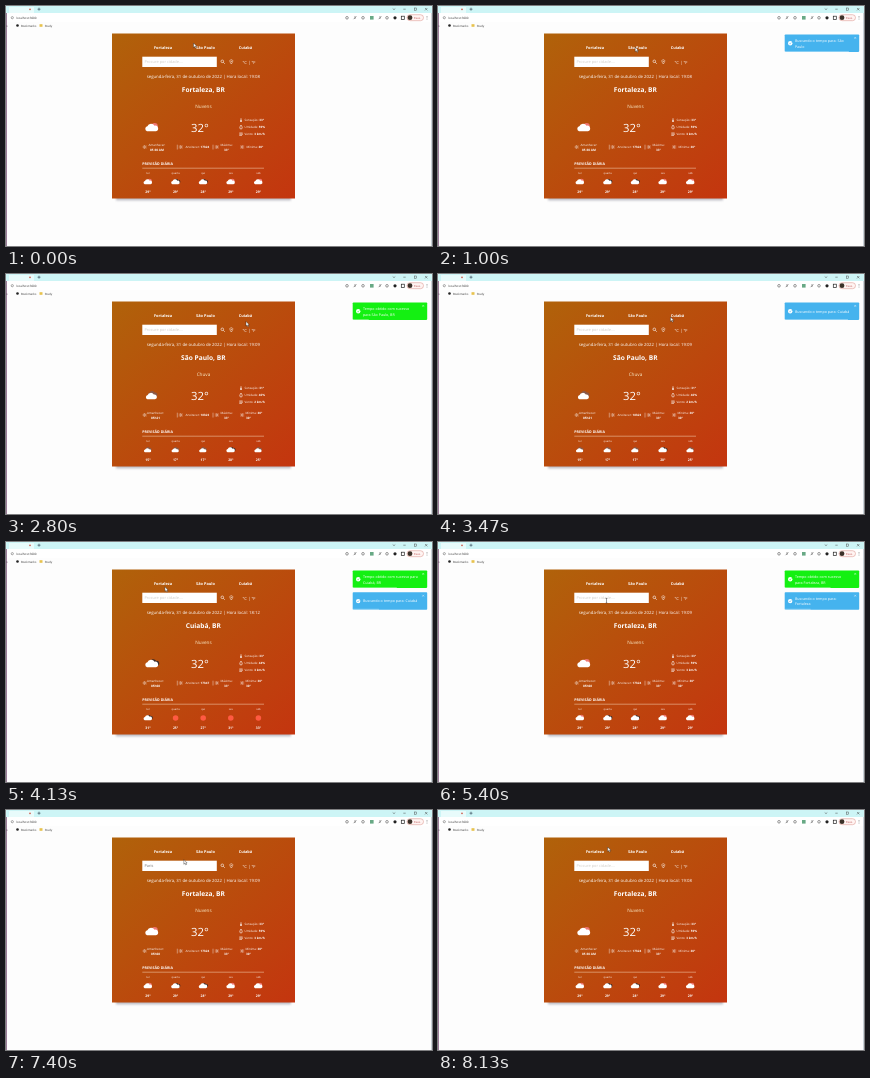
Recreate the animation shown at these times as an HTML page. Size 426 by 240 pixels, loop 8.19 s.

```html
<!DOCTYPE html>
<html lang="pt-BR">
<head>
<meta charset="utf-8">
<title>Previsão do tempo</title>
<style>
  html, body { margin: 0; width: 100%; height: 100%; overflow: hidden; background: #fdfdfd; }
  svg { display: block; width: 100%; height: 100%; }
  text { font-family: "Open Sans", "Noto Sans", sans-serif; text-rendering: geometricPrecision; white-space: pre; }
</style>
</head>
<body>
<svg id="stage" viewBox="0 0 426 240" xmlns="http://www.w3.org/2000/svg">
  <defs>
    <linearGradient id="warm" x1="0" y1="0" x2="1" y2="1">
      <stop offset="0" stop-color="#b0620a"/>
      <stop offset="1" stop-color="#c4350f"/>
    </linearGradient>
    <filter id="soft" x="-10%" y="-10%" width="120%" height="125%"><feGaussianBlur stdDeviation="1.2"/></filter>
  </defs>
  <g id="browser"></g>
  <rect x="110" y="32" width="175" height="162.3" fill="#778" opacity=".5" filter="url(#soft)"/>
  <rect x="106" y="27.5" width="183" height="165" fill="url(#warm)"/>
  <g id="controls"></g>
  <g id="query"></g>
  <g id="weather"></g>
  <g id="toasts"></g>
  <g id="cursor">
    <path id="arrow" d="M0 0V4.6L1.1 3.6 1.9 5.2 2.7 4.8 1.9 3.3H3.3Z" fill="#fff" stroke="#222" stroke-width=".4"/>
    <path id="beam" d="M-.8 0H.8M0 0V4.4M-.8 4.4H.8" fill="none" stroke="#333" stroke-width=".5"/>
  </g>
</svg>
<script>
const LOOP = 8190;
const $ = id => document.getElementById(id);

const text = (x, y, size, str, { fill = '#fff', weight = 500, anchor = 'start' } = {}) =>
  `<text x="${x}" y="${y}" font-size="${size}" fill="${fill}" font-weight="${weight}" text-anchor="${anchor}">${str}</text>`;
const mid = { anchor: 'middle' };
const boldMid = { weight: 700, anchor: 'middle' };
const rect = (x, y, w, h, fill, extra = '') =>
  `<rect x="${x}" y="${y}" width="${w}" height="${h}" fill="${fill}" ${extra}/>`;
const circle = (x, y, r, fill, extra = '') =>
  `<circle cx="${x}" cy="${y}" r="${r}" fill="${fill}" ${extra}/>`;
const line = (d, color = '#fff', width = .5) =>
  `<path d="${d}" fill="none" stroke="${color}" stroke-width="${width}"/>`;
const at = (x, y, scale, content) => `<g transform="translate(${x} ${y}) scale(${scale})">${content}</g>`;

const cloudShape = fill =>
  `<path d="M-5 3.5A2.6 2.6 0 0 1-4.6-1.5 4 4 0 0 1 2.6-2 2.8 2.8 0 0 1 4 3.5Z" fill="${fill}"/>`;
const skies = {
  sunny: cloud => circle(2.6, -1.6, 3.2, '#ee7670') + cloud,
  rain: cloud => at(.8, -1.6, .75, cloudShape('#8a5a48')) + at(-.4, .6, .85, cloud),
  dark: cloud => at(2, -1.1, .85, cloudShape('#3a2a26')) + cloud,
  clear: () => circle(0, 0, 4.2, '#ff5a42'),
};
const sky = (kind, x, y, scale) => at(x, y, scale, skies[kind](cloudShape('#fff')));

const sunIcon = (x, y) => {
  const rays = Array.from({ length: 8 }, (_, i) => {
    const a = i * Math.PI / 4, c = Math.cos(a), s = Math.sin(a);
    return `M${c * 1.4} ${s * 1.4}L${c * 2} ${s * 2}`;
  }).join('');
  return at(x, y, 1, circle(0, 0, .9, 'none', 'stroke="#fff" stroke-width=".5"') + line(rays, '#fff', .45));
};

const scenes = {
  start: {
    city: 'Fortaleza', hour: '19:08', sky: 'sunny', status: 'Nuvens', feels: '33°', humid: '59%', wind: '3 km/h',
    rise: '05:30 AM', set: '17h24', wrap: false,
    icons: ['sunny', 'dark', 'dark', 'sunny', 'sunny'], temps: [29, 29, 28, 29, 29],
  },
  paulo: {
    city: 'São Paulo', hour: '19:09', sky: 'rain', status: 'Chuva', feels: '31°', humid: '46%', wind: '2 km/h',
    rise: '05h21', set: '18h23', wrap: true,
    icons: ['rain', 'rain', 'rain', 'dark', 'rain'], temps: [15, 17, 17, 20, 25],
  },
  cuiaba: {
    city: 'Cuiabá', hour: '18:12', sky: 'dark', status: 'Nuvens', feels: '33°', humid: '44%', wind: '3 km/h',
    rise: '05h08', set: '17h47', wrap: true,
    icons: ['dark', 'clear', 'clear', 'clear', 'clear'], temps: [31, 25, 27, 31, 33],
  },
};
scenes.fortaleza = { ...scenes.start, hour: '19:09', rise: '05h08', wrap: true };
const days = ['ter', 'quarta', 'qui', 'sex', 'sáb'];

const sceneTimes = [[0, 'start'], [1530, 'paulo'], [3670, 'cuiaba'], [4870, 'fortaleza'], [7600, 'start']];

const BLUE = '#45b3ee', GREEN = '#14f012';
const toasts = [
  { from: 800, to: 2250, color: BLUE, lines: ['Buscando o tempo para: São', 'Paulo'] },
  { from: 1530, to: 3150, color: GREEN, lines: ['Tempo obtido com sucesso', 'para São Paulo, BR'] },
  { from: 3270, to: 4600, color: BLUE, lines: ['Buscando o tempo para: Cuiabá'] },
  { from: 3670, to: 4800, color: GREEN, lines: ['Tempo obtido com sucesso para', 'Cuiabá, BR'] },
  { from: 4470, to: 5900, color: BLUE, lines: ['Buscando o tempo para:', 'Fortaleza'] },
  { from: 4870, to: 6250, color: GREEN, lines: ['Tempo obtido com sucesso', 'para Fortaleza, BR'] },
];

const cursorPath = [
  [0, 187.5, 37], [350, 189, 38], [750, 197, 41], [1600, 198, 42], [2500, 239, 44], [2800, 240, 47.5],
  [3250, 238, 43], [3600, 230, 43], [4050, 159, 45], [4500, 158, 43], [4900, 159, 45],
  [5350, 168.5, 56.5], [6900, 169, 56.5], [7600, 180, 48], [8100, 169.5, 37], [LOOP, 170, 37],
];

const clamp = v => Math.max(0, Math.min(1, v));
const ease = v => v * v * (3 - 2 * v);

function drawBrowser() {
  const icons = [341, 349, 357, 374, 381].map((x, i) => i % 2
    ? line(`M${x - 1.4} 13.2L${x + 1.4} 10.4M${x} 10V13`, '#555', .55)
    : circle(x, 11.8, 1.3, 'none', 'stroke="#555" stroke-width=".6"')).join('');
  const menu = [10.5, 11.8, 13.1].map(y => circle(421, y, .4, '#444')).join('');
  $('browser').innerHTML =
    rect(0, 0, 426, 240, '#fdfdfd') +
    rect(0, 0, 426, 7, '#cdf5f6') +
    rect(3, 1, 25, 6, '#e8fbfb') + circle(24, 3.4, .8, '#c54') +
    line('M31.5 3.2H34.5M33 1.7V4.7', '#234', .55) +
    line('M386.7 2.5L388 3.7 389.3 2.5M397.3 3.2H399.7M419 2L421.4 4.4M421.4 2L419 4.4', '#444', .5) +
    rect(408.5, 2, 2.2, 2.2, 'none', 'stroke="#444" stroke-width=".45"') +
    rect(0, 7, 426, 9, '#fff') +
    circle(6.3, 11.7, 1.1, 'none', 'stroke="#555" stroke-width=".5"') +
    text(10.3, 13.1, 3, 'localhost:3000', { fill: '#333' }) + icons +
    rect(364, 10, 3.6, 3.6, '#68a985') + circle(389, 11.8, 1.6, '#222') +
    rect(395.3, 10.2, 3, 3.2, '#fff', 'stroke="#222" stroke-width=".7"') +
    rect(401, 8.7, 16.5, 6, '#fff4f2', 'rx="3" stroke="#d98c85" stroke-width=".5"') +
    circle(404, 11.7, 2.4, '#3b3128') + text(407.8, 12.8, 2.8, 'Paus.', { fill: '#b55' }) + menu +
    text(-1, 20.7, 3, 'io', { fill: '#333' }) + circle(11.5, 19.5, 1.3, '#222') +
    text(15, 20.7, 2.9, 'Bookmarks', { fill: '#333' }) +
    rect(33.5, 18.2, 3, 2.6, '#e8c34e') + text(38.7, 20.7, 2.9, 'Study', { fill: '#333' }) +
    rect(0, 7, .7, 233, '#70466e') + rect(425, 7, .6, 233, '#a9b6c2');
}

function drawControls() {
  const cities = [['Fortaleza', 157], ['São Paulo', 199.5], ['Cuiabá', 239.5]];
  $('controls').innerHTML =
    cities.map(([name, x]) => text(x, 43.2, 3.9, name, boldMid)).join('') +
    rect(136.3, 50.7, 74.5, 10.3, '#fff') +
    circle(216.3, 55.3, 1.3, 'none', 'stroke="#fff" stroke-width=".6"') + line('M217.3 56.3L218.7 57.7', '#fff', .7) +
    `<path d="M225.3 58C223 55 223.8 53.7 225.3 53.7S227.6 55 225.3 58Z" fill="none" stroke="#fff" stroke-width=".5"/>` +
    circle(225.3, 55.2, .5, '#fff') +
    text(243, 57.6, 4.2, '°C | °F', mid);
}

function drawWeather(s) {
  const pair = (x, y, label, value) =>
    `<text x="${x}" y="${y}" font-size="3" font-weight="500" fill="#fff">${label} <tspan font-weight="700">${value}</tspan></text>`;
  const stacked = (x, label, value) => text(x, 139.7, 3, label, mid) + text(x, 144.6, 3.1, value, boldMid);
  const columns = days.map((day, i) => {
    const x = 142 + i * 27.6;
    return text(x, 168.2, 2.6, day, mid) + sky(s.icons[i], x, 176, .66) +
      text(x, 186.6, 3.4, s.temps[i] + '°', boldMid);
  }).join('');
  const low = s.wrap
    ? pair(239.5, 139.7, 'Mínima:', '30°') + text(242.5, 144.6, 3.1, '30°', boldMid)
    : pair(240.5, 142, 'Mínima:', '30°');

  $('weather').innerHTML =
    text(197.3, 72.1, 4.3, `segunda-feira, 31 de outubro de 2022 | Hora local: ${s.hour}`, { ...mid, weight: 400 }) +
    text(197.3, 86.4, 6.6, `${s.city}, BR`, boldMid) +
    text(197.5, 101.8, 4.7, s.status, { fill: '#fbeecb', anchor: 'middle' }) +
    sky(s.sky, 146, 121.7, 1) +
    text(194, 125.8, 11.3, '32°', mid) +
    line('M235 112.3V115', '#fff', .7) + circle(235, 115.1, .9, '#fff') +
    `<path d="M235 119Q232.5 122.8 235 123 237.5 122.8 235 119Z" fill="none" stroke="#fff" stroke-width=".6"/>` +
    line('M233.3 127H236.6M233.3 128.2H237M233.3 129.4H236', '#fff', .6) +
    pair(238.5, 115.3, 'Sensação:', s.feels) +
    pair(238.5, 122.2, 'Umidade:', s.humid) +
    pair(238.5, 129, 'Vento:', s.wind) +
    sunIcon(138.6, 141) + stacked(s.wrap ? 149.5 : 151, 'Amanhecer:', s.rise) +
    line('M171.3 138.7V143.5M207 138.7V143.5', '#fff', .4) +
    sunIcon(174.7, 141) + pair(179.5, 142, 'Anoitecer:', s.set) +
    sunIcon(210.8, 141) + stacked(220.5, 'Máxima:', '33°') +
    sunIcon(236.2, 141) + low +
    text(136.3, 158.5, 3.6, 'PREVISÃO DIÁRIA', { weight: 700 }) +
    line('M136.3 162.2H258', '#f5d9bd', .5) + columns;
}

function drawQuery(t) {
  const typed = t < 7600 ? 'Paris'.slice(0, Math.max(0, Math.floor((t - 6000) / 110))) : '';
  $('query').innerHTML = text(138.5, 57.4, 3.9, typed || 'Procure por cidade....',
    { fill: typed ? '#777' : '#cfccc6', weight: 400 });
}

function drawToasts(t) {
  const active = toasts.filter(n => t >= n.from && t < n.to).reverse();
  $('toasts').innerHTML = active.map((n, i) => {
    const enter = 1 - (1 - clamp((t - n.from) / 180)) ** 3;
    const leave = clamp((t - n.to + 180) / 180);
    const shift = 80 * (1 - enter + leave * leave);
    const [first, second] = n.lines;
    const body = rect(0, 0, 74.5, 17.5, n.color, 'rx=".8"') +
      circle(5.5, 8.9, 2.2, '#fff') + line('M4.5 8.9L5.3 9.8 6.6 8', n.color, .5) +
      text(10.2, second ? 7.5 : 10.2, 3.65, first) + (second ? text(10.2, 13.2, 3.65, second) : '') +
      line('M69.6 2.6L71.4 4.4M71.4 2.6L69.6 4.4', '#fff', .4) +
      rect(0, 16.6, 74.5 * (1 - clamp((t - n.from) / (n.to - n.from))), .9, '#fff', 'opacity=".4"');
    return at(346.7 + shift, 28.4 + i * 21.8, 1, body);
  }).join('');
}

function moveCursor(t) {
  const next = Math.max(1, cursorPath.findIndex(p => p[0] > t));
  const [t0, x0, y0] = cursorPath[next - 1], [t1, x1, y1] = cursorPath[next];
  const k = ease(clamp((t - t0) / (t1 - t0)));
  const x = x0 + (x1 - x0) * k, y = y0 + (y1 - y0) * k;
  const overInput = x > 136 && x < 211 && y > 50.7 && y < 61;
  $('cursor').setAttribute('transform', `translate(${x} ${y})`);
  $('arrow').setAttribute('visibility', overInput ? 'hidden' : 'visible');
  $('beam').setAttribute('visibility', overInput ? 'visible' : 'hidden');
}

let shown;
function render(t) {
  const scene = sceneTimes.filter(([start]) => start <= t).pop()[1];
  if (scene !== shown) drawWeather(scenes[shown = scene]);
  drawQuery(t);
  drawToasts(t);
  moveCursor(t);
}

drawBrowser();
drawControls();
render(0);
const began = performance.now();
function tick() {
  render((performance.now() - began) % LOOP);
  requestAnimationFrame(tick);
}
requestAnimationFrame(tick);
</script>
</body>
</html>
```
